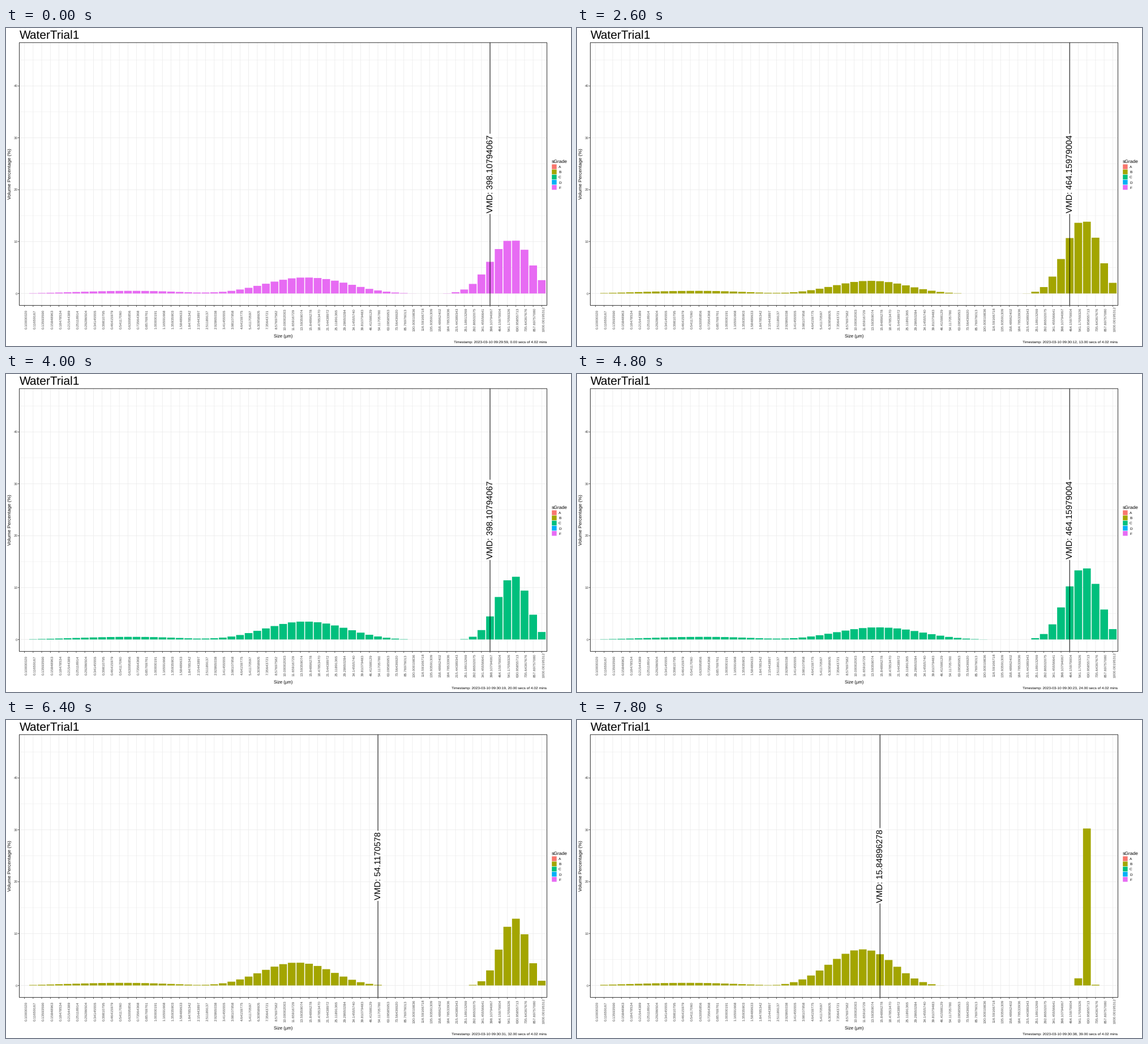
Write a matplotlib script that moves like this. It is 998 px wide and 561 px high and loops after 8 s.

```python
import numpy as np
import matplotlib.pyplot as plt
from matplotlib.animation import FuncAnimation
from matplotlib.patches import Rectangle

W, H, DPI = 998, 561, 100
PT = 72 / DPI
plt.rcParams["font.family"] = "Liberation Sans"
plt.rcParams["text.hinting"] = "none"
plt.rcParams["path.snap"] = False

BINS = 61
LEFT, RIGHT, TOP, BOTTOM = 23.5, 955.5, 25.8, 489.4
STEP = (RIGHT - LEFT) / (BINS + 0.2)
Y0, UNIT = 468.3, 9.153
COLORS = {"A": "#F8766D", "B": "#A3A500", "C": "#00BF7D",
          "D": "#00B0F6", "F": "#E76BF3"}

bins = np.arange(BINS)
centres = LEFT + STEP * (bins + 0.6)
# Size classes: 15 per decade, stored in single precision
sizes = np.float32(0.1 * (1 + 1.965e-6) * 10 ** (bins / 15))

# Key points: second, grade, coarse peak, centre and spread, middle centre
KEYS = [
    (0, "F", 10.35, 56.5, 3.45, 32.5),
    (7, "B", 13.8, 56.6, 2.9, 31.5),
    (13, "B", 14.1, 56.55, 2.95, 31.8),
    (20, "C", 12.2, 56.7, 2.7, 32.4),
    (24, "C", 13.9, 56.6, 2.9, 32.6),
    (32, "B", 12.9, 56.85, 2.35, 31.5),
    (39, "B", 30.25, 57, 0.58, 30.9),
]
SECS, GRADES, *TRACKS = zip(*KEYS)


def hump(centre, left, right, cut):
    """Lopsided bell of height 1 whose tails reach zero."""
    d = bins - centre
    bell = np.where(d < 0, np.exp(-np.abs(d / left) ** 2),
                    np.exp(-np.abs(d / right) ** 2.25))
    return np.maximum((1 + cut) * bell - cut, 0)


def volumes(sec):
    peak, centre, spread, mid = [np.interp(sec, SECS, t) for t in TRACKS]
    drift = mid - 30.9
    v = peak * hump(centre, spread, 0.88 * spread, 0.006)
    v += 0.5 * hump(10.6 + 1.1 * drift, 9.2, 8.1, 0.145)
    v[0] = 0
    # The middle hump holds whatever is left of 100 %
    middle = hump(mid, 5.3 + 0.74 * drift, 5 + 1.2 * drift, 0.02)
    return v + middle * (100 - v.sum()) / middle.sum()


def median_bin(v):
    tail = np.cumsum(v[::-1])[::-1]
    return int(np.flatnonzero(tail >= 50)[-1])


fig = plt.figure(figsize=(W / DPI, H / DPI), dpi=DPI, facecolor="white")
ax = fig.add_axes([0, 0, 1, 1])
ax.set_xlim(0, W)
ax.set_ylim(H, 0)
ax.axis("off")


def text(x, y, s, px, color="black", ha="left", va="center_baseline", **kw):
    return ax.text(x, y, s, fontsize=px * PT, color=color, ha=ha, va=va, **kw)


def line(xs, ys, color, px, z):
    return ax.plot(xs, ys, color=color, lw=px * PT, zorder=z,
                   solid_capstyle="butt")[0]


def box(x, y, w, h, color, z):
    return ax.add_patch(Rectangle((x, y), w, h, fc=color, ec="none", zorder=z))


# Grid, ticks and tick labels
for val in range(0, 50, 5):
    y = Y0 - val * UNIT
    major = val % 10 == 0
    line([LEFT, RIGHT], [y, y], "#EBEBEB", 0.8 if major else 0.5, 1)
    if major:
        line([LEFT - 2.5, LEFT], [y, y], "#333333", 0.8, 4)
        text(LEFT - 2.7, y, str(val), 6.5, "#4D4D4D", ha="right")
for x, size in zip(centres, sizes):
    line([x, x], [TOP, BOTTOM], "#EBEBEB", 0.8, 1)
    line([x, x], [BOTTOM, BOTTOM + 2.5], "#333333", 0.8, 4)
    text(x + 3.4, 513.8, f"{size:.8f}", 6.5, "#4D4D4D", ha="center",
         va="center", rotation=90)

bars = [box(x - 0.45 * STEP, Y0, 0.9 * STEP, 0, "white", 2) for x in centres]
mark = line([0, 0], [TOP, BOTTOM], "black", 1, 3)
vmd = text(0, 257.3, "", 15.05, ha="center", va="center", rotation=90, zorder=5,
           bbox=dict(fc="white", ec="none", pad=1.4))
ax.add_patch(Rectangle((LEFT, TOP), RIGHT - LEFT, BOTTOM - TOP, fc="none",
                       ec="#333333", lw=PT, zorder=6))

# Titles, legend and caption
text(23.5, 19, "WaterTrial1", 20.9, va="baseline")
text((LEFT + RIGHT) / 2, 543, "Size (µm)", 7.8, ha="center")
text(7, 257, "Volume Percentage (%)", 8.45, ha="center", va="center", rotation=90)
text(964, 235.2, "sGrade", 8.5)
for i, (grade, color) in enumerate(COLORS.items()):
    y = 244.7 + 9.13 * i
    box(964.2, y - 4.2, 8.4, 8.4, color, 2)
    text(976, y + 0.3, grade, 6.5)
caption = text(RIGHT, 554, "", 6.5, ha="right")


def draw(sec):
    v = volumes(sec)
    nearest = np.argmin(np.abs(np.array(SECS) - sec))
    for bar, val in zip(bars, v):
        bar.set_height(-val * UNIT)
        bar.set_facecolor(COLORS[GRADES[nearest]])
    k = median_bin(v)
    mark.set_xdata([centres[k]] * 2)
    vmd.set_x(centres[k] + 0.8)
    vmd.set_text("VMD: " + f"{sizes[k]:.8f}".rstrip("0"))
    minute, second = divmod(29 * 60 + 59 + sec, 60)
    caption.set_text(f"Timestamp: 2023-03-10 09:{minute:02d}:{second:02d}, "
                     f"{sec:.2f} secs of 4.02 mins")
    return bars + [mark, vmd, caption]


anim = FuncAnimation(fig, draw, frames=40, interval=200, repeat=True,
                     repeat_delay=0, blit=False, cache_frame_data=False)
plt.show()
```
